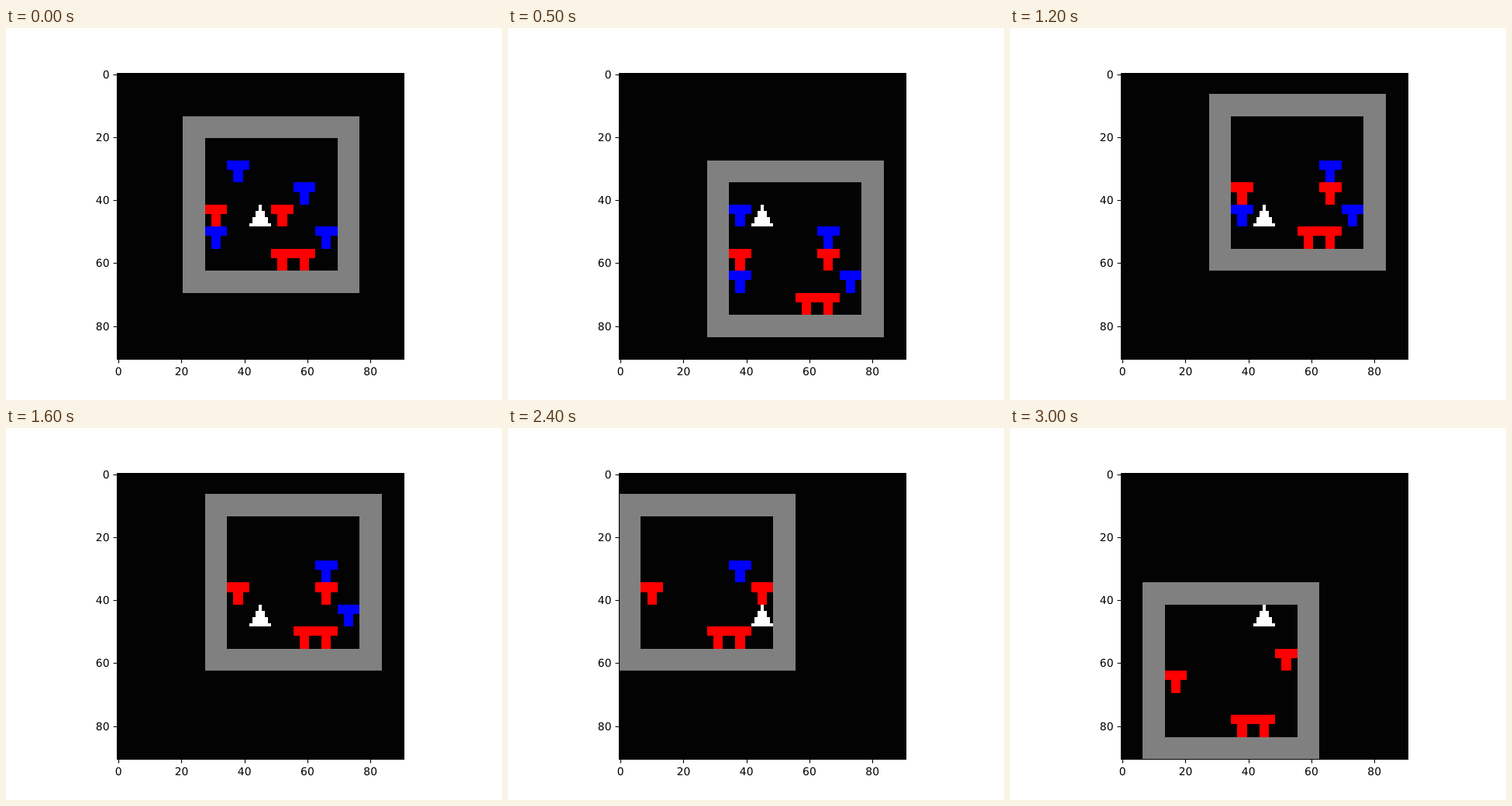
Animation of 640x480 px, one loop 3100 ms. Source, as an HTML page with a canvas:

```html
<!DOCTYPE html>
<html lang="en">
<head>
<meta charset="utf-8">
<title>Grid world</title>
<style>
  html, body { margin: 0; width: 100%; height: 100%; overflow: hidden; background: #fff; }
  canvas, svg { position: absolute; left: 0; top: 0; width: 640px; height: 480px; }
  text { font: 13.889px "DejaVu Sans", sans-serif; text-rendering: geometricPrecision; }
  path { fill: none; stroke: #000; stroke-width: 1.111; }
</style>
</head>
<body>
<canvas id="view" width="640" height="480"></canvas>
<svg id="axes" viewBox="0 0 640 480"><path d="M143.5 58.5H513.5V427.5H143.5Z"/></svg>
<script>
const STEP = 100, CELL = 7, CENTER = 6, ROOM = 6;
const MOVES = "RULULL" + "RDDUDD" + "LDRUUU" + "RDRRDR" + "RULUUU";
const DIRS = { L: [-1, 0], R: [1, 0], U: [0, -1], D: [0, 1] };
const BLACK = "#030303", GRAY = "#808080", RED = "#f00", BLUE = "#00f";

const box = (color, x, y) => ({ color, x, y });
const start = {
  x: 2, y: 3,
  boxes: [
    box(BLUE, 1, 1), box(BLUE, 4, 2), box(BLUE, 0, 4), box(BLUE, 5, 4),
    box(RED, 0, 3), box(RED, 3, 3), box(RED, 3, 5), box(RED, 4, 5)
  ]
};
const inside = (x, y) => x >= 0 && y >= 0 && x < ROOM && y < ROOM;

// Boxes can be pushed; a blue one pushed into the wall disappears.
function move(state, key) {
  const [dx, dy] = DIRS[key];
  const x = state.x + dx, y = state.y + dy;
  if (!inside(x, y)) return state;
  const hit = state.boxes.find(b => b.x === x && b.y === y);
  if (!hit) return { ...state, x, y };
  const boxes = state.boxes.filter(b => b !== hit);
  if (inside(x + dx, y + dy)) boxes.push(box(hit.color, x + dx, y + dy));
  else if (hit.color === RED) return state;
  return { x, y, boxes };
}

const states = [start];
for (const key of MOVES) states.push(move(states[states.length - 1], key));

const ctx = document.getElementById("view").getContext("2d");
const px = p => Math.round(143 + p * 370 / 91);
const py = p => Math.round(57 + p * 370 / 91);

function rect(color, x, y, w, h) {
  ctx.fillStyle = color;
  ctx.fillRect(px(x), py(y), px(x + w) - px(x), py(y + h) - py(y));
}

function draw({ x, y, boxes }) {
  const ox = (CENTER - x) * CELL, oy = (CENTER - y) * CELL, size = ROOM * CELL;
  rect(BLACK, 0, 0, 91, 91);
  rect(GRAY, ox - CELL, oy - CELL, size + 2 * CELL, size + 2 * CELL);
  rect(BLACK, ox, oy, size, size);
  for (const b of boxes) {
    const bx = ox + b.x * CELL, by = oy + b.y * CELL;
    rect(b.color, bx, by, 7, 3);
    rect(b.color, bx + 2, by + 3, 3, 4);
  }
  const a = CENTER * CELL;
  for (let i = 0; i < 4; i++) rect("#fff", a + 3 - i, a + 2 * i, 1 + 2 * i, i < 3 ? 2 : 1);
}

function add(name, attrs, content = "") {
  const el = document.createElementNS("http://www.w3.org/2000/svg", name);
  for (const k in attrs) el.setAttribute(k, attrs[k]);
  el.textContent = content;
  document.getElementById("axes").append(el);
}

for (let v = 0; v <= 80; v += 20) {
  const d = (v + 0.5) * 369.6 / 91;
  const x = 143.2 + d, y = Math.round(57.6 + d);
  add("path", { d: `M${Math.round(x) + 0.5} 427.5v5M143.5 ${y + 0.5}h-5` });
  add("text", { x, y: 448, "text-anchor": "middle" }, v);
  add("text", { x: 133.5, y: y + 5, "text-anchor": "end" }, v);
}

// Keep the view inside the axes frame.
ctx.beginPath();
ctx.rect(143, 58, 371, 370);
ctx.clip();

let shown = -1;
function tick() {
  const i = Math.floor(performance.now() / STEP) % states.length;
  if (i !== shown) draw(states[shown = i]);
  requestAnimationFrame(tick);
}
tick();
</script>
</body>
</html>
```
